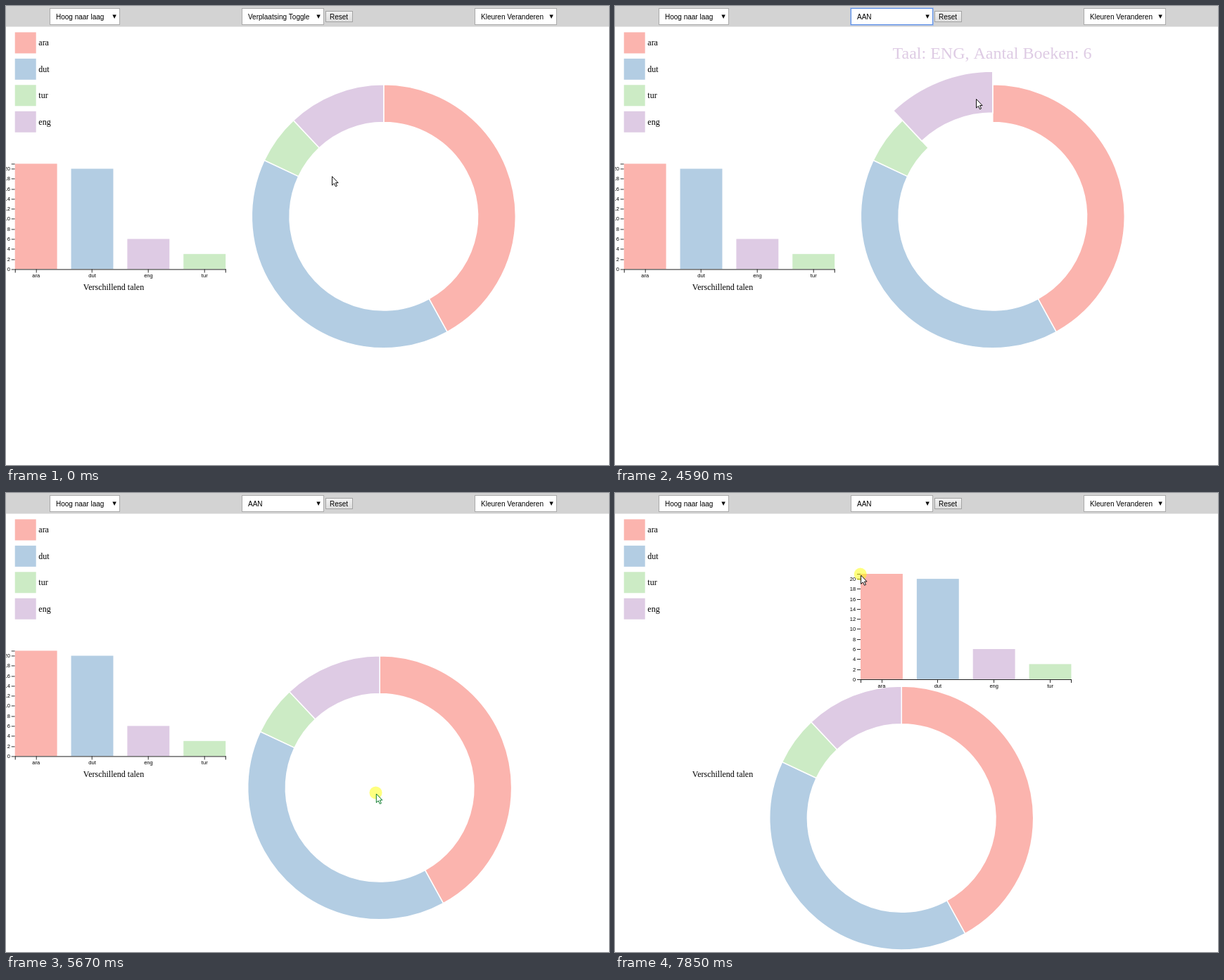
An HTML page with a canvas that plays this animation: 857x653 px, repeating every 8000 ms.

```html
<!DOCTYPE html>
<html lang="nl">
<head>
<meta charset="utf-8">
<title>Verschillend talen</title>
<style>
html, body { margin: 0; width: 100%; height: 100%; overflow: hidden; background: #fff }
canvas { display: block }
</style>
</head>
<body>
<canvas id="stage" width="857" height="653"></canvas>
<script>
const ctx = document.getElementById('stage').getContext('2d');
const SANS = '"Liberation Sans", Arial, sans-serif';
const SERIF = '"Liberation Serif", "Times New Roman", serif';
const LOOP = 8000, LAG = 20, GRAB = 1.5, FADE = 300;
const OPEN = 1880, CLOSE = 3360, DRAG_DONUT = 4820, DRAG_CHART = 6840;
const COLORS = { ara: '#fbb4ae', dut: '#b3cde3', tur: '#ccebc5', eng: '#decbe4' };
const COUNTS = { ara: 21, dut: 20, tur: 3, eng: 6 };

const clamp = p => Math.min(1, Math.max(0, p));
const smooth = p => p * p * (3 - 2 * p);
const linear = p => p;
const cubic = p => p < .5 ? 4 * p ** 3 : 1 - 4 * (1 - p) ** 3;
const within = (t, a, b) => t >= a && t < b;

// pointer moves: each runs from the previous end point, bent towards `via`
const START = [463, 242];
const MOVES = [
  { from: 800, to: 1650, via: [496, 127], end: [408, 21] },
  { from: OPEN, to: 2430, end: [397, 45] },
  { from: 3740, to: 4510, end: [513, 132] },
  { from: DRAG_DONUT, to: 5280, end: [438, 295.5] },
  { from: 5280, to: 5590, end: [538, 410] },
  { from: 5590, to: 5910, via: [505, 470], end: [407.2, 464] },
  { from: 6060, to: DRAG_CHART, via: [-33, 309], end: [112, 270] },
  { from: DRAG_CHART, to: 7830, via: [221, 229], end: [349, 116.5], ease: linear }
];
const HOVERS = [
  { lang: 'eng', from: 1090, to: 1345 },
  { lang: 'eng', from: 4250, to: 4860 },
  { lang: 'dut', from: 6260, to: 6340 }
];

function pointer(t) {
  let pos = START;
  for (const { from, to, via, end, ease = smooth } of MOVES) {
    if (t < from) break;
    const u = ease(clamp((t - from) / (to - from))), v = 1 - u;
    pos = pos.map((p, i) => {
      const c = via ? via[i] : (p + end[i]) / 2;
      return v * v * p + 2 * u * v * c + u * u * end[i];
    });
  }
  return pos;
}

function dragged(t) {
  const [x, y] = pointer(t - LAG);
  return [x, y - GRAB];
}

function growth(lang, t) {
  let g = 0;
  for (const h of HOVERS) {
    if (h.lang !== lang || t < h.from) continue;
    g = cubic(clamp((Math.min(t, h.to) - h.from) / FADE)) * (1 - cubic(clamp((t - h.to) / FADE)));
  }
  return 1 + .1 * g;
}

function rect(x, y, w, h, fill) {
  ctx.fillStyle = fill;
  ctx.fillRect(x, y, w, h);
}

function frame(x, y, w, h, color) {
  ctx.strokeStyle = color;
  ctx.lineWidth = 1;
  ctx.strokeRect(x + .5, y + .5, w - 1, h - 1);
}

function text(s, x, y, size, font, align = 'left', color = '#000') {
  ctx.font = size + 'px ' + font;
  ctx.textAlign = align;
  ctx.fillStyle = color;
  ctx.fillText(s, x, y);
}

function polygon(points, fill, stroke) {
  ctx.beginPath();
  points.forEach(([x, y]) => ctx.lineTo(x, y));
  ctx.closePath();
  ctx.fillStyle = fill;
  ctx.fill();
  if (!stroke) return;
  ctx.strokeStyle = stroke;
  ctx.lineWidth = 1;
  ctx.stroke();
}

function select(x, w, label, border = '#aaa') {
  rect(x, 3, w, 24, '#fff');
  frame(x, 3, w, 24, border);
  text(label, x + 9, 19, 10, SANS);
  const a = x + w - 8;
  polygon([[a - 2.6, 12.5], [a + 2.8, 12.5], [a + .1, 18]], '#000');
}

function header(t) {
  rect(0, 0, 857, 29.5, '#d3d3d3');
  select(62, 100, 'Hoog naar laag');
  select(666, 117, 'Kleuren Veranderen');
  const focus = within(t, OPEN, DRAG_DONUT);
  if (focus) frame(334, 2, 119, 26, '#a9bfe6');
  select(335, 117, t < CLOSE ? 'Verplaatsing Toggle' : 'AAN',
    focus ? '#5b8ee6' : within(t, 1570, OPEN) ? '#888' : '#aaa');
  const g = ctx.createLinearGradient(0, 7, 0, 23);
  g.addColorStop(0, '#f4f4f4');
  g.addColorStop(1, '#dcdcdc');
  rect(454, 7, 39, 16, g);
  frame(454, 7, 39, 16, '#a3a3a3');
  text('Reset', 473, 19, 10, SANS, 'center');
}

function menu(t) {
  if (!within(t, OPEN, CLOSE)) return;
  rect(335, 27, 117, 39, '#fff');
  const row = 12.4, active = pointer(t)[1] < 28 + row ? 0 : 1;
  ['Verplaatsing Toggle', 'AAN', 'UIT'].forEach((s, i) => {
    if (i === active) rect(336, 28 + i * row, 115, row, '#1e90ff');
    text(s, 344, 37.5 + i * row, 10, SANS, 'left', i === active ? '#fff' : '#000');
  });
  frame(335, 27, 117, 39, '#a9a9a9');
}

function legend() {
  Object.keys(COLORS).forEach((lang, i) => {
    const y = 37.4 + i * 37.45;
    rect(12.7, y, 30, 30, COLORS[lang]);
    text(lang, 46.3, Math.round(y + 19), 12, SERIF);
  });
}

function barChart(x, y) {
  ctx.save();
  ctx.translate(x, y);
  const height = 149.8, unit = height / 21, base = 150;
  for (let n = 0; n <= 20; n += 2) {
    const ty = Math.round(height - n * unit);
    rect(-5, ty, 5, 1, '#333');
    text(n, -6.8, ty + 3, 7.5, SANS, 'right');
  }
  rect(-5, 0, 5, 1, '#333');
  const sorted = Object.keys(COUNTS).sort((a, b) => COUNTS[b] - COUNTS[a]);
  sorted.forEach((lang, i) => {
    const h = COUNTS[lang] * unit, bx = i * 79.85;
    rect(bx, height - h, 59.9, h, COLORS[lang]);
    rect(Math.round(bx + 29.5), base, 1, 5, '#333');
    text(lang, bx + 30, base + 12, 7.5, SANS, 'center');
  });
  rect(0, base, 300, 1, '#222');
  rect(0, base, 1, 5, '#222');
  rect(299, base, 1, 5, '#222');
  ctx.restore();
}

function donut(x, y, t) {
  ctx.save();
  ctx.beginPath();
  ctx.rect(0, 29.5, 857, 622);
  ctx.clip();
  let a = -Math.PI / 2;
  for (const lang in COUNTS) {
    const b = a + COUNTS[lang] / 50 * 2 * Math.PI, s = growth(lang, t);
    ctx.beginPath();
    ctx.arc(x, y, 187.5 * s, a, b);
    ctx.arc(x, y, 133.8 * s, b, a, true);
    ctx.closePath();
    ctx.fillStyle = COLORS[lang];
    ctx.fill();
    ctx.strokeStyle = '#fff';
    ctx.lineWidth = 1.5 * s;
    ctx.stroke();
    a = b;
  }
  ctx.restore();
}

function title(t) {
  const h = HOVERS.find(h => within(t, h.from, h.to));
  if (!h) return;
  text(`Taal: ${h.lang.toUpperCase()}, Aantal Boeken: ${COUNTS[h.lang]}`,
    536, 75, 24, SERIF, 'center', COLORS[h.lang]);
}

function cursor(t) {
  const [x, y] = pointer(t), dragging = within(t, DRAG_DONUT, 5990);
  const click = within(t, OPEN, OPEN + 80) || within(t, CLOSE, CLOSE + 80);
  if (click || dragging || t >= DRAG_CHART) {
    ctx.beginPath();
    ctx.arc(x - .3, y - 1, 9, 0, 2 * Math.PI);
    ctx.fillStyle = 'rgba(255,255,0,.5)';
    ctx.fill();
  }
  const arrow = [[0, 0], [0, 12.5], [2.9, 9.8], [5, 14.3], [7, 13.4], [5, 9], [8.6, 9]];
  polygon(arrow.map(([dx, dy]) => [x + .5 + dx, y + .5 + dy]), '#fff', dragging ? '#0a7a2a' : '#111');
}

function draw(t) {
  rect(0, 0, 857, 653, '#fff');
  legend();
  text('Verschillend talen', 153, 404, 12, SERIF, 'center');
  const chartMoved = t >= 6920;
  if (!chartMoved) barChart(12.7, 224.4);
  donut(...(t < 4860 ? [536.8, 299.3] : dragged(Math.min(t, 6000))), t);
  // a dragged part comes to the front
  if (chartMoved) barChart(...dragged(t));
  title(t);
  header(t);
  menu(t);
  cursor(t);
}

const start = performance.now();
function tick() {
  draw((performance.now() - start) % LOOP);
  requestAnimationFrame(tick);
}
tick();
</script>
</body>
</html>
```
